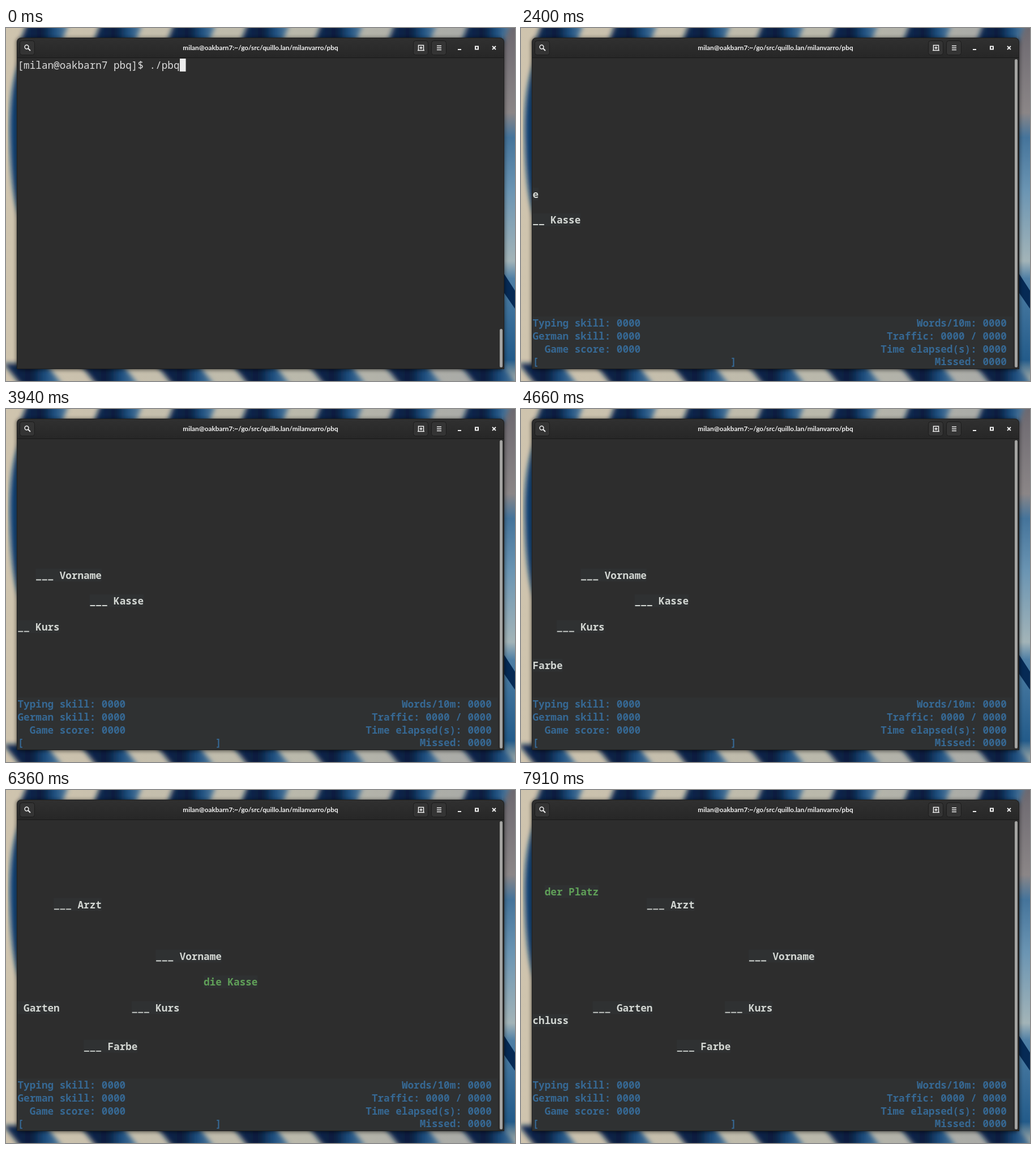
Write an HTML page that moves like this. It is 899 by 623 pixels and loops after 8000 ms.

```html
<!DOCTYPE html>
<html lang="en">
<head>
<meta charset="utf-8">
<title>Word drill</title>
<style>
html, body { margin: 0; width: 100%; height: 100%; overflow: hidden; background: #2d2d2d; }
svg { display: block; width: 899px; height: 623px; }
text { white-space: pre; }
.mono { font: 17.667px "Noto Sans Mono", "DejaVu Sans Mono", monospace; }
.bold { font-weight: 700; }
.title { font: 700 11.8px Lato, "Open Sans", sans-serif; fill: #f2f2f2; text-anchor: middle; }
.btn { fill: #343434; stroke: #1c1c1c; }
.icon { fill: none; stroke: #f0f0f0; stroke-width: 1.5; }
</style>
</head>
<body>
<svg viewBox="0 0 899 623">
  <defs>
    <linearGradient id="sky" x2="1" y2="0">
      <stop offset="0" stop-color="#cfc4ae"/>
      <stop offset=".6" stop-color="#b9b8ab"/>
      <stop offset="1" stop-color="#a5a7a6"/>
    </linearGradient>
    <linearGradient id="side" x2="0" y2="1">
      <stop offset="0" stop-color="#6d6970"/>
      <stop offset=".24" stop-color="#8b8687"/>
      <stop offset=".31" stop-color="#45749b"/>
      <stop offset=".46" stop-color="#6b95b3"/>
      <stop offset=".66" stop-color="#a3b4b8"/>
      <stop offset=".71" stop-color="#4f7fa5"/>
      <stop offset=".94" stop-color="#235b8a"/>
      <stop offset="1" stop-color="#b5b5a8"/>
    </linearGradient>
    <linearGradient id="blade">
      <stop offset="0" stop-color="#0a2d58"/>
      <stop offset=".45" stop-color="#071c3c"/>
      <stop offset=".7" stop-color="#1d4f80"/>
      <stop offset="1" stop-color="#5f86a3"/>
    </linearGradient>
    <linearGradient id="head" x2="0" y2="1">
      <stop offset="0" stop-color="#303030"/>
      <stop offset="1" stop-color="#272727"/>
    </linearGradient>
    <filter id="soft" x="-20%" y="-20%" width="140%" height="140%"><feGaussianBlur stdDeviation="4"/></filter>
    <filter id="shade" x="-5%" y="-5%" width="110%" height="110%"><feGaussianBlur stdDeviation="3"/></filter>
  </defs>

  <rect width="899" height="623" fill="url(#sky)"/>
  <rect x="878" width="21" height="623" fill="url(#side)"/>
  <g id="blades" fill="url(#blade)" filter="url(#soft)"></g>
  <path d="M24 60Q4 110 7 200Q9 290 24 335Z" fill="#0b3f75" filter="url(#soft)"/>
  <path d="M876 428L902 468V500L876 462Z" fill="#062a55"/>

  <rect x="18" y="17" width="863" height="587" rx="8" fill="#000" opacity=".5" filter="url(#shade)"/>
  <path d="M19 602V25a8 8 0 0 1 8-8H872a8 8 0 0 1 8 8V602Z" fill="#1e1e1e"/>
  <path d="M20 52V25a7 7 0 0 1 7-7H872a7 7 0 0 1 7 7V52Z" fill="url(#head)"/>
  <rect x="20" y="53" width="859" height="548" fill="#2d2d2d"/>
  <path d="M20 52.5H879" stroke="#191919"/>

  <g class="btn">
    <rect x="24.5" y="22.5" width="26" height="25" rx="4"/>
    <rect x="719.5" y="22.5" width="26" height="25" rx="4"/>
    <rect x="751.5" y="22.5" width="26" height="25" rx="4"/>
  </g>
  <g class="icon">
    <circle cx="36.5" cy="33.5" r="3.4"/>
    <path d="M39 36L43 40" stroke-width="2"/>
    <path d="M728.5 39V30.5H737.5V39M727 39.5H739M733 32.5V37.5M730.5 35H735.5"/>
    <path d="M761 31.5H769M761 35H769M761 38.5H769"/>
    <path d="M798 38H804" stroke-width="2"/>
    <rect x="829" y="32.5" width="5" height="5" stroke-width="2"/>
    <path d="M859 32L865 38M865 32L859 38" stroke-width="1.8"/>
  </g>
  <text class="title" x="449.5" y="38.5">milan@oakbarn7:~/go/src/quillo.lan/milanvarro/pbq</text>

  <g id="prompt">
    <text class="mono" x="20.5" y="72" fill="#dcdcdc">[milan@oakbarn7 pbq]$ ./pbq</text>
    <rect id="cursor" x="307" y="54" width="10.6" height="22.76" fill="#ececec"/>
  </g>
  <g id="stats"></g>
  <g id="words"></g>
  <rect id="thumb" x="872" width="5" rx="2.5" fill="#a4a4a2"/>
</svg>
<script>
const LOOP = 8000, CELL = 10.6, LINE = 22.76, LEFT = 20.5, TOP = 54;
const $ = id => document.getElementById(id);
const colX = c => LEFT + c * CELL;
const rowY = r => TOP + r * LINE;

function add(parent, tag, attrs, text) {
  const el = document.createElementNS('http://www.w3.org/2000/svg', tag);
  for (const k in attrs) el.setAttribute(k, attrs[k]);
  if (text) el.textContent = text;
  parent.appendChild(el);
  return el;
}

const write = (parent, text, col, row, fill) =>
  add(parent, 'text', { class: 'mono bold', x: colX(col), y: rowY(row) + 18, fill }, text);

// Wallpaper: curved blades lean left at the top edge and right at the bottom
for (let i = 0; i < 7; i++) {
  add($('blades'), 'path', { d: `M${38 + i * 130} -10h74l-14 36h-74z` });
  add($('blades'), 'path', { d: `M${i * 134 - 4} 592h74l32 40h-74z` });
}

// Score panel
const stats = $('stats');
add(stats, 'rect', { x: 20, y: rowY(20), width: 848.5, height: 601 - rowY(20), fill: '#2f3132' });
const left = ['Typing skill: 0000', 'German skill: 0000', '  Game score: 0000', '[' + ' '.repeat(32) + ']'];
const right = ['Words/10m: 0000', 'Traffic: 0000 / 0000', 'Time elapsed(s): 0000', 'Missed: 0000'];
left.forEach((s, i) => write(stats, s, 0, 20 + i, '#366893'));
right.forEach((s, i) => write(stats, s, 79 - s.length, 20 + i, '#366893'));

// Runs of evenly spaced ticks: first time, last time, count
const runs = [
  [1560, 2280, 7], [2400, 3120, 7], [3230, 3940, 7], [4070, 4790, 7], [4900, 5030, 2],
  [5170, 5880, 7], [5990, 6720, 7], [6850, 6960, 2], [7100, 7800, 7], [7910, 7910, 1]
];
const ticks = runs.flatMap(([a, b, n]) =>
  Array.from({ length: n }, (_, i) => Math.round((a + (b - a) * i / Math.max(1, n - 1)) / 10) * 10));

// Each word enters at tick `from`; a solved one halts after `stop` and leaves at `gone`
const words = [
  { noun: 'Kasse', row: 12, from: 0, article: 'die', stop: 39, gone: 43 },
  { noun: 'Vorname', row: 10, from: 7 },
  { noun: 'Kurs', row: 14, from: 14 },
  { noun: 'Farbe', row: 17, from: 21 },
  { noun: 'Arzt', row: 6, from: 27 },
  { noun: 'Garten', row: 14, from: 34 },
  { noun: 'Platz', row: 5, from: 41, article: 'der', stop: 51, gone: 60 },
  { noun: 'Schluss', row: 15, from: 48 }
];

for (const w of words) {
  w.box = add($('words'), 'rect', { y: rowY(w.row), height: LINE, fill: '#2f3132' });
  w.text = write($('words'), '', 0, w.row, '#d3d7d3');
  w.blanks = add($('words'), 'path', { fill: '#d3d7d3' });
}

function place(w, tick) {
  const shown = tick >= w.from && !(tick >= w.gone);
  for (const el of [w.box, w.text, w.blanks]) el.style.display = shown ? '' : 'none';
  if (!shown) return;
  const solved = tick > w.stop;
  const end = (solved ? w.stop : tick) - w.from + 1;
  const full = (solved ? w.article : '___') + ' ' + w.noun;
  const part = full.slice(-end);
  const col = end - part.length;
  w.box.setAttribute('x', colX(col));
  w.box.setAttribute('width', part.length * CELL);
  w.text.setAttribute('x', colX(col));
  w.text.setAttribute('fill', solved ? '#60a058' : '#d3d7d3');
  w.text.textContent = part.replace(/_/g, ' ');
  // Blank slots keep a small gap between them
  const y = rowY(w.row) + 19;
  w.blanks.setAttribute('d', [...part].map((c, i) =>
    c === '_' ? `M${colX(col + i) + 0.8} ${y}h9v1.8h-9z` : '').join(''));
}

function draw(t) {
  const started = t >= 610;
  $('prompt').style.display = started ? 'none' : '';
  $('cursor').style.display = t < 60 ? '' : 'none';
  stats.style.display = t >= 730 ? '' : 'none';
  $('thumb').setAttribute('y', started ? 55 : 531);
  $('thumb').setAttribute('height', started ? 544 : 68);
  const tick = ticks.filter(x => x <= t).length - 1;
  words.forEach(w => place(w, tick));
}

const start = performance.now();
function loop() {
  draw((performance.now() - start) % LOOP);
  requestAnimationFrame(loop);
}
loop();
</script>
</body>
</html>
```
